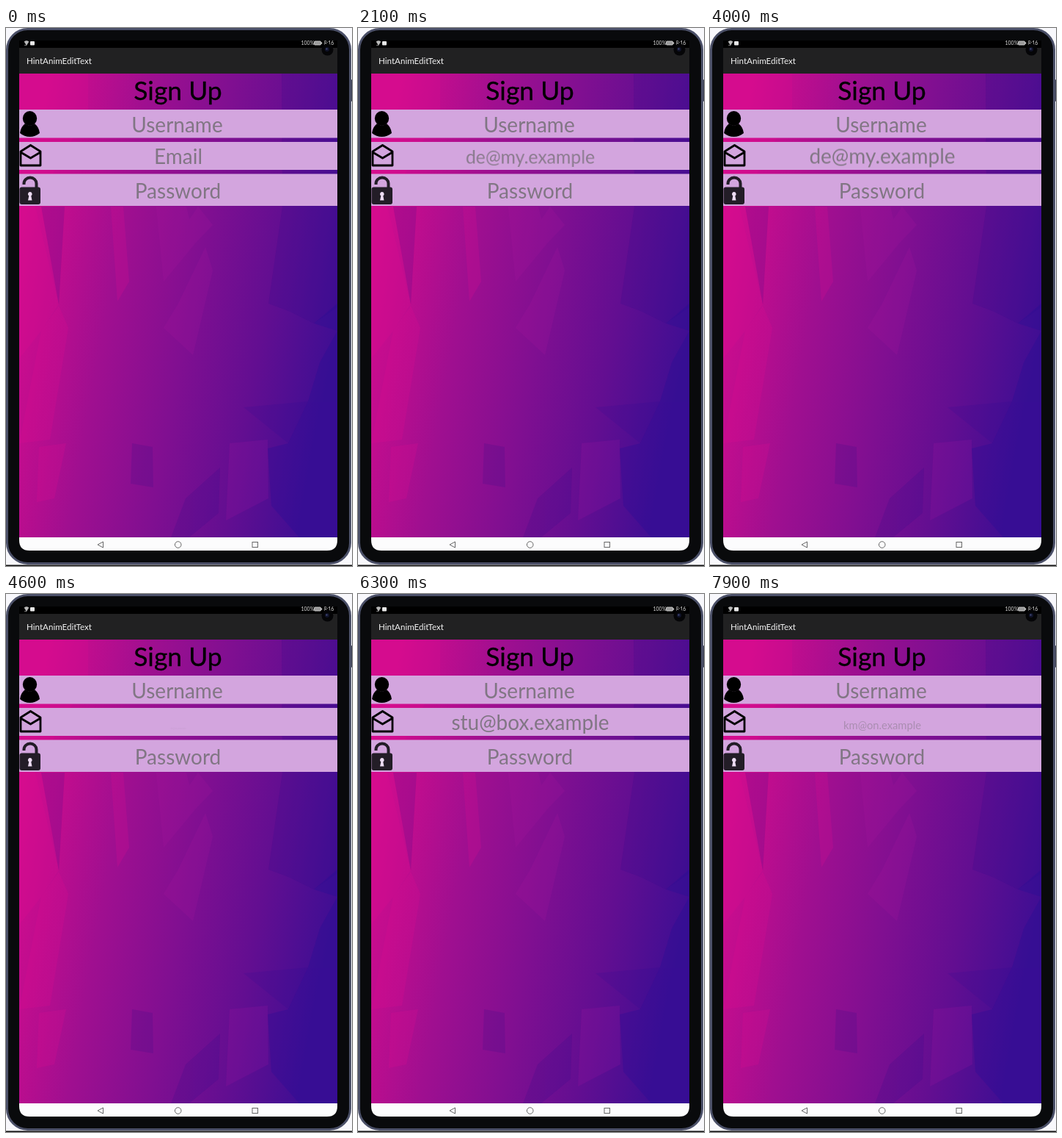
Write an HTML page that moves like this. It is 472 px wide and 732 px high and loops after 8000 ms.

```html
<!DOCTYPE html>
<html lang="en">
<head>
<meta charset="utf-8">
<title>Sign up form with animated hint</title>
<style>
html, body { margin: 0; width: 100%; height: 100%; overflow: hidden; background: #f8f8fc; }
svg { display: block; width: 472px; height: 732px; }
text { font-family: Lato, "Open Sans", sans-serif; }
.title { font-size: 35.5px; text-anchor: middle; stroke: #000; stroke-width: .3; }
.field { font-size: 28px; text-anchor: middle; fill: #817684; }
.status { font-size: 7px; fill: #ddd; }
.hint { animation: 8s linear infinite; }
.h0 { animation-name: first; }
.h1 { animation-name: second; }
.h2 { animation-name: third; }
.h3 { animation-name: fourth; }
@keyframes first {
  0%, 15.25% { transform: scale(1); opacity: 1; }
  20.6%, 100% { transform: scale(0); opacity: 0; }
}
@keyframes second {
  0%, 20.6% { transform: scale(0); opacity: 0; }
  27%, 52.75% { transform: scale(1); opacity: 1; }
  58.1%, 100% { transform: scale(0); opacity: 0; }
}
@keyframes third {
  0%, 58.1% { transform: scale(0); opacity: 0; }
  64.5%, 90.25% { transform: scale(1); opacity: 1; }
  95.6%, 100% { transform: scale(0); opacity: 0; }
}
@keyframes fourth {
  0%, 95.4% { transform: scale(0); opacity: 0; }
  100% { transform: scale(.72); opacity: .68; }
}
</style>
</head>
<body>
<svg viewBox="0 0 472 732">
  <defs>
    <linearGradient id="wall" gradientUnits="userSpaceOnUse" x1="10" y1="335" x2="450" y2="415">
      <stop offset="0" stop-color="#d20c8e"/>
      <stop offset=".12" stop-color="#c00d8e"/>
      <stop offset=".3" stop-color="#a00f90"/>
      <stop offset=".55" stop-color="#800f91"/>
      <stop offset=".78" stop-color="#620e91"/>
      <stop offset="1" stop-color="#400e93"/>
    </linearGradient>
    <clipPath id="view"><rect x="18" y="62" width="434" height="631"/></clipPath>
  </defs>

  <!-- tablet body -->
  <rect y="730.5" width="472" height="1.5" fill="#111"/>
  <rect x="469" y="70" width="3" height="30" rx="1" fill="#3b3f52"/>
  <rect x="1.5" y="1.500" width="468" height="727" rx="28" fill="#090a0c" stroke="#4b5068" stroke-width="3"/>
  <path d="M18 17H452V697Q452 711 438 711H32Q18 711 18 697Z" fill="#fcfcfd"/>
  <rect x="18" y="17" width="434" height="10" fill="#000"/>
  <rect x="18" y="27" width="434" height="35" fill="#212122"/>

  <!-- status bar -->
  <path d="M25 18.5Q28 16.5 31 18.5L28 23.5ZM25 23.5H28" fill="#bbb" stroke="#bbb" stroke-width=".6"/>
  <rect x="33" y="18" width="6" height="5.5" rx="1" fill="#e8e8e8"/>
  <text class="status" x="402.5" y="23.3">100%</text>
  <rect x="420.5" y="18" width="9" height="5" rx="1" fill="#999" stroke="#ddd" stroke-width=".8"/>
  <rect x="430" y="19.5" width="1.2" height="2" fill="#ddd"/>
  <text class="status" x="433.5" y="23.3">8:16</text>
  <circle cx="438.500" cy="29.500" r="8" fill="#050507"/>
  <circle cx="438" cy="29" r="3" fill="#11142a"/>
  <circle cx="437.500" cy="28.500" r="1.1" fill="#4a5388"/>
  <text x="28" y="49" font-size="11.6" fill="#f2f2f2">HintAnimEditText</text>

  <!-- faceted wallpaper -->
  <g clip-path="url(#view)">
    <rect x="18" y="62" width="434" height="631" fill="url(#wall)"/>
    <g fill="#e00c90" opacity=".22">
      <path d="M18 62H112V111L40 243L72 376L48 412L18 450Z"/>
      <path d="M72 378L85 408L60 560L18 565L48 412Z"/>
      <path d="M143 243L160 243L168 345L152 372Z"/>
      <path d="M45 570L82 565L66 640L42 645Z"/>
    </g>
    <g fill="#b018a0" opacity=".16">
      <path d="M262 243L282 268L258 293L245 268Z"/>
      <path d="M235 375L272 298L282 330L255 445L215 408Z"/>
      <path d="M205 243H246L258 293L215 345Z"/>
      <path d="M305 565L357 560L358 640L300 670Z"/>
    </g>
    <g fill="#2a0c88" opacity=".16">
      <path d="M376 62H452V380L420 402L385 385L358 375L377 243Z"/>
      <path d="M172 565L200 570L201 625L170 620Z"/>
      <path d="M245 640L292 598L290 660L250 693H225Z"/>
      <path d="M48 243H80L72 376Z"/>
    </g>
    <g fill="#1c0e96" opacity=".26">
      <path d="M452 375L420 402L452 412Z"/>
      <path d="M452 412L428 455L412 508L385 565L357 572L362 650L400 693H452Z"/>
    </g>
    <path d="M324 516L412 508L385 565Z" fill="#1c0e96" opacity=".12"/>
  </g>

  <text class="title" x="234.500" y="98">Sign Up</text>

  <g fill="#d3a5de">
    <rect x="18" y="111" width="434" height="38.500"/>
    <rect x="18" y="155" width="434" height="38"/>
    <rect x="18" y="198.500" width="434" height="43.500"/>
  </g>

  <!-- field icons -->
  <ellipse cx="32.500" cy="123" rx="9.700" ry="10"/>
  <path d="M26 130Q32.500 135 39 130Q45 135 46 143Q40 148 32.500 148Q25 148 19 143Q20 135 26 130Z"/>
  <path d="M20 168L33.500 159.500L47 168V187H20ZM20 169L33.500 177L47 169" fill="none" stroke="#000" stroke-width="2.800" stroke-linejoin="round"/>
  <path d="M24.500 213V211.500A8.500 8 0 0 1 41.500 211.500V218" fill="none" stroke="#231d27" stroke-width="4"/>
  <rect x="18.500" y="216.500" width="28.500" height="23.500" rx="3" fill="#231d27"/>
  <path d="M32.800 223A3 3 0 0 1 34.300 228.500L35.500 234.500H30L31.300 228.500A3 3 0 0 1 32.800 223Z" fill="#ecdcf2"/>

  <g class="field">
    <text x="233.500" y="142">Username</text>
    <text x="234.500" y="232">Password</text>
    <g transform="translate(235 184.500)">
      <text class="hint h0">Email</text>
      <text class="hint h1">de@my.example</text>
      <text class="hint h2">stu@box.example</text>
      <text class="hint h3">km@on.example</text>
    </g>
  </g>

  <!-- navigation bar -->
  <g fill="none" stroke="#666" stroke-width="1">
    <path d="M125 703L132.500 699V707Z"/>
    <circle cx="234.700" cy="703" r="4.300"/>
    <rect x="336" y="699.500" width="7.500" height="7"/>
  </g>
</svg>
</body>
</html>
```
